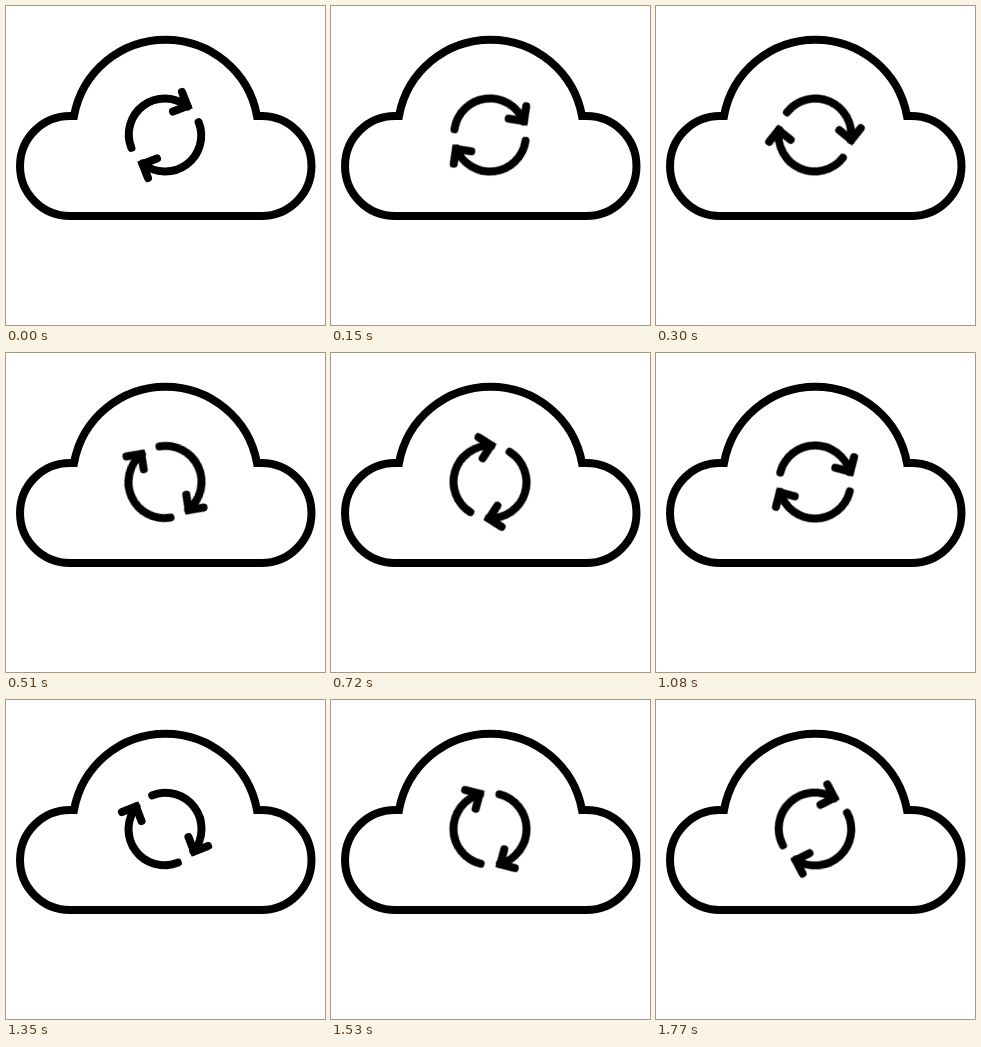
These frames come from a looping animation (319x319 px, 1800 ms). An HTML page:

```html
<!DOCTYPE html>
<html lang="en">
<head>
<meta charset="utf-8">
<title>Cloud sync</title>
<style>
  html, body { margin: 0; width: 100%; height: 100%; overflow: hidden; background: #fff; }
  svg { display: block; width: 100%; height: 100%; }
  path { fill: none; stroke: #000; stroke-width: 8; stroke-linejoin: miter; }
  .arrow path { stroke-linecap: round; }
  #spin { transform-origin: 0 0; }
</style>
</head>
<body>
<svg viewBox="0 0 319 319">
  <defs>
    <g id="arrow" class="arrow">
      <path d="M-33.6 12.9A36 36 0 0 1 22.5 -28.5"/>
      <path d="M17 -43L22.5 -29L8 -23.5"/>
    </g>
  </defs>
  <path d="M64 210A50 50 0 0 1 64 110H68A93 93 0 0 1 251 110H255.5A50 50 0 0 1 255.5 210Z"/>
  <g transform="translate(159 129)">
    <g id="spin">
      <use href="#arrow"/>
      <use href="#arrow" transform="rotate(180)"/>
    </g>
  </g>
</svg>
<script>
  const LOOP = 1800, STEP = 30;
  // One full turn per loop, in hard steps of 6 degrees
  document.getElementById('spin').animate(
    [{ transform: 'rotate(0deg)' }, { transform: 'rotate(360deg)' }],
    { duration: LOOP, iterations: Infinity, easing: `steps(${LOOP / STEP}, end)` }
  );
</script>
</body>
</html>
```
